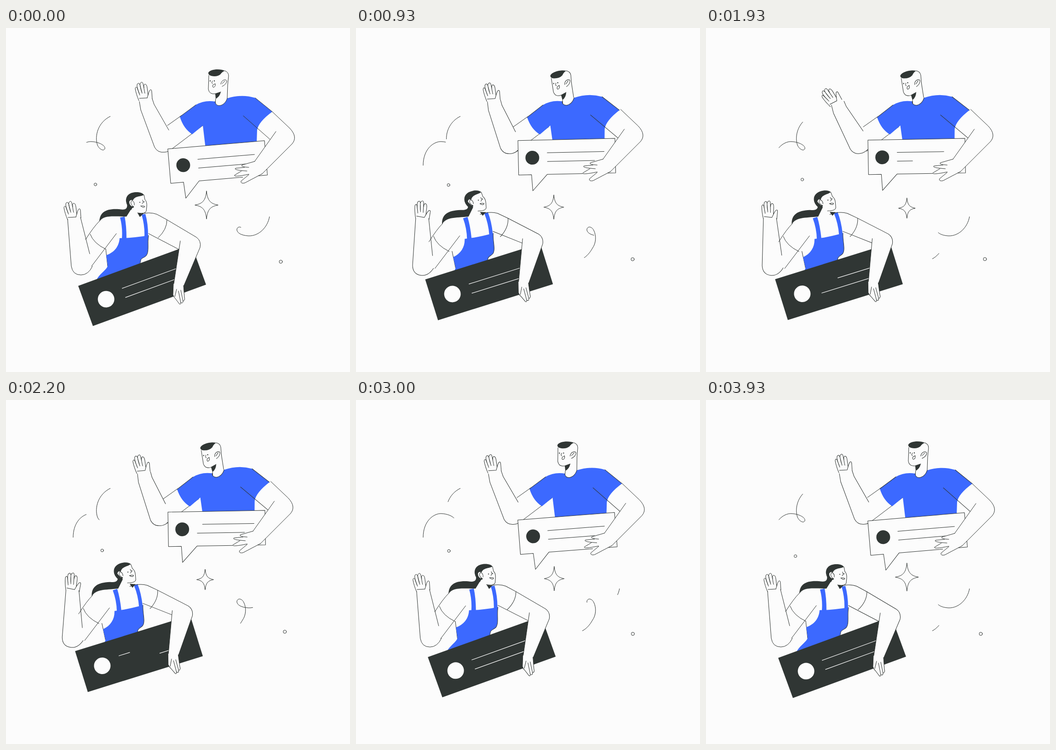
These frames come from a looping animation (748x748 px, 4 s). An HTML page:

```html
<!DOCTYPE html>
<html lang="en">
<head>
<meta charset="utf-8">
<title>Two people waving with cards</title>
<style>
  html, body { margin: 0; width: 100%; height: 100%; overflow: hidden; background: #fcfcfc; }
  svg { display: block; width: 100vw; height: 100vh; fill: none; stroke: #2c312f; stroke-width: 1; stroke-linecap: round; stroke-linejoin: round; }
  .blue { fill: #3c69ff; stroke: none; }
  .dark { fill: #303634; stroke: none; }
  .skin { fill: #fcfcfc; }
  .mask { fill: #fcfcfc; stroke: none; }
  .pale { stroke: #fcfcfc; stroke-width: 1.2; }
  .curl { stroke-linecap: butt; }
</style>
</head>
<body>
<svg viewBox="0 0 748 748">
  <defs>
    <path id="hand" d="M-10 6Q-16 -8 -18 -20Q-17 -26 -14 -22L-8 -6M-9 -9Q-15 -24 -14 -29Q-11 -35 -8 -29L-3 -10M-4 -13Q-9 -29 -7 -32Q-3 -37 -1 -31L3 -10M1 -22Q0 -29 3 -30Q7 -30 8 -22L10 -6M8 0Q12 -15 14 -17Q18 -20 18 -12L19 2M-9 1L8 0"/>
  </defs>

  <path id="curlLeft" class="curl" pathLength="100" stroke-dasharray="70 30" d="M146 299C146 262 170 246 186 247C204 248 216 256 215 262C213 269 203 264 199 255C192 235 200 205 227 192"/>
  <path id="curlRight" class="curl" pathLength="100" stroke-dasharray="57.5 42.5" d="M573 410C569 433 550 453 527 452C512 451 503 446 502 439C502 431 512 430 517 440C523 452 522 468 514 479C508 490 500 498 492 502"/>
  <path id="star" vector-effect="non-scaling-stroke" d="M0 -30C2 -10 8 -3 25 0C8 3 2 10 0 30C-2 10 -8 3 -25 0C-8 -3 -2 -10 0 -30Z"/>
  <circle id="dotLeft" r="3"/>
  <circle id="dotRight" r="3.5"/>

  <g id="man">
    <g id="manArm">
      <path d="M351 212L382 190M428 212L358 265"/>
      <g id="manForearm">
        <path d="M354 222L322 166L318 154M290 160L293 178L323 259Q330 272 345 270Q352 270 362 262"/>
        <g id="manHand"><use href="#hand" x="299" y="152"/></g>
      </g>
    </g>
    <g id="shirt">
      <path class="blue" d="M378 193L413 167Q432 156 455 160C455 173 475 172 481 153Q512 143 542 152L579 182Q549 204 546 222L545 252L434 262L428 212L405 231Q386 219 378 193Z"/>
      <path d="M378 193L413 167M542 152L579 182M516 191L575 243M455 160C455 173 475 172 481 153"/>
    </g>
    <g id="manHead">
      <path class="dark" d="M440 97C444 89 466 88 476 93Q470 95 466 101Q458 107 446 104Q439 102 440 97ZM455 143L467 139Q465 149 456 154Z"/>
      <path d="M476 93Q484 96 484 104L482 124L481 153M441 103L440 133Q442 145 455 143L467 139M456 154L455 162"/>
      <path d="M449 115Q446 120 449 121M450 124L455 121Q456 128 451 129Q448 128 450 124M467 122C468 113 478 110 480 115C480 121 474 125 470 127M470 121L476 115"/>
      <g id="manEyes" class="dark"><circle cx="444" cy="115" r="1.2"/><circle cx="453" cy="115" r="1.2"/></g>
    </g>
    <g id="manCard">
      <path class="skin" d="M-211 0H0V75H-149L-181 110L-183 75H-211Z"/>
      <circle class="dark" cx="-180.5" cy="38" r="15"/>
      <path id="manLine1"/><path id="manLine2"/>
    </g>
    <g id="manGrip">
      <path class="skin" d="M579 182L617 218Q635 237 622 252L556 318L540 291L587 225"/>
      <path class="mask" d="M541 290L513 298L512 303L498 306L505 312L496 322L516 322L511 336L520 337L557 317Z"/>
      <path d="M541 290L513 298Q509 302 528 303M519 303L499 305Q494 309 524 311M512 311L497 320Q494 325 528 318M528 319L511 333Q510 339 519 337L557 317"/>
    </g>
  </g>

  <g id="woman">
    <g id="womanForearm">
      <path d="M162 412L182 491M134 416L142 518Q145 537 163 537Q179 537 188 518"/>
      <g id="womanHand"><use href="#hand" x="144" y="411"/></g>
    </g>
    <path id="womanSleeve" d="M203 420Q190 433 173 460M183 448Q190 468 217 481M240 447L186 518"/>
    <g id="womanTorso">
      <path d="M217 481L221 518M310 447L377 482"/>
      <path class="dark" d="M286 402L299 404L291 411Z"/>
      <path class="blue" d="M248 412L258 410Q262 430 262 457L252 458Q254 435 248 412ZM295 406L303 404Q309 425 309 452L301 454Q302 430 295 406Z"/>
      <path class="blue" d="M247 457Q275 457 310 451C307 468 312 486 305 495C300 500 294 500 293 505L291 515L230 560L197 548C202 535 222 524 221 516L218 494C236 488 246 474 247 457Z"/>
      <path d="M310 451C307 468 312 486 305 495C300 500 294 500 293 505L291 515"/>
    </g>
    <path id="ponytail" class="dark" d="M262 376C266 392 262 397 246 394C218 392 204 400 203 421C213 406 232 410 262 410L274 391Z"/>
    <g id="womanHead">
      <path class="dark" d="M261 377C260 362 272 356 287 357Q297 358 300 363C292 367 280 365 276 375Q270 372 268 378Q268 386 276 389L272 396Q262 386 261 377Z"/>
      <path d="M300 363L302 373Q307 378 306 388L305 398Q303 405 286 402M297 374Q300 381 296 382M293 387Q298 386 302 388Q300 393 293 387M276 388Q268 380 274 375Q280 378 279 385"/>
      <g class="dark"><circle cx="291" cy="379" r="1.1"/><circle cx="300" cy="378" r="1.1"/><circle cx="276" cy="389" r="2"/></g>
    </g>
    <g id="womanCard">
      <path class="dark" d="M-262 0H0V-93H-262Z"/>
      <circle class="mask" cx="-215" cy="-45" r="18"/>
      <path id="womanLine1" class="pale"/><path id="womanLine2" class="pale"/>
    </g>
    <g id="womanGrip">
      <path d="M290 405Q312 399 328 405L350 417Q350 438 331 456"/>
      <path class="skin" d="M350 417L414 455Q425 463 422 477L386 562L364 562L379 463"/>
      <path class="mask" d="M364 556L363 580L368 588L377 600L380 600L385 596L388 588L386 559Z"/>
      <path d="M364 556L363 580Q365 586 368 588L377 600Q380 602 380 597L375 572M380 597Q385 600 385 594L380 570M385 594Q390 592 388 586L386 560M371 568L367 584"/>
    </g>
  </g>
</svg>
<script>
const FRAMES = 60, STEP = 4000 / FRAMES, RETURN = 41;
const TAU = 2 * Math.PI;
const $ = id => document.getElementById(id);
const place = (id, transform) => $(id).setAttribute('transform', transform);

const ease = (f, start, length) => {
  const u = Math.min(1, Math.max(0, (f - start) / length));
  return u * u * (3 - 2 * u);
};

// Damped step from 0 to 1 that overshoots by a fifth after seven frames.
function spring(f) {
  if (f <= 0) return 0;
  const omega = Math.PI / 7, decay = Math.log(5) / 7;
  return 1 - Math.exp(-decay * f) * (Math.cos(omega * f) + decay / omega * Math.sin(omega * f));
}

// Three swings of an arm, from 0 to 1 and back.
function wave(f, start) {
  const swings = (f - start) / 9.6;
  return swings > 0 && swings < 3 ? (1 - Math.cos(TAU * swings)) / 2 : 0;
}

const cycle = (f, period, peak) => Math.cos(TAU * (f - peak) / period);

// A card line is wiped from the left and written again, twice per loop.
function drawLine(id, f, { x0, x1, y, start, period, hold }) {
  const erase = f < start + period ? start : start + period;
  const gone = ease(f, erase, 6.3), written = ease(f, erase + hold, 6.3);
  const x = u => x0 + (x1 - x0) * u;
  let d = '';
  if (written > 0) d += `M${x0} ${y}H${x(written)}`;
  if (gone < 1) d += `M${x(gone)} ${y}H${x1}`;
  $(id).setAttribute('d', d);
}

function drawMan(f) {
  const back = spring(f - RETURN);
  const lean = ease(f, 0, 13) - back;
  const nod = ease(f, 0, 15) - back;
  const tilt = ease(f, 4, 12) - back;
  place('manArm', `translate(${-9 * lean} ${3 * lean})`);
  place('manForearm', `rotate(${8 * wave(f, 9) - 5.3 * lean} 340 262)`);
  place('manHand', `rotate(${-20 * wave(f, 5.6)} 304 165)`);
  place('shirt', `translate(${-6 * lean} ${-lean}) rotate(${-1.3 * lean} 475 190)`);
  place('manHead', `translate(${-6.5 * lean} 0) rotate(${-11 * nod} 470 158)`);
  place('manCard', `translate(${562 + lean} ${245 - 5 * lean}) rotate(${-4.9 + 3.9 * tilt})`);
  place('manGrip', `translate(${-3.5 * lean} ${-5 * lean})`);
  const blink = f >= 37 && f <= 39;
  place('manEyes', blink ? 'translate(0 97.75) scale(1 .15)' : '');

  const timing = { x0: -148, period: 12.6, hold: 5.2 };
  drawLine('manLine1', f, { ...timing, x1: -24, y: 28, start: 19.2 });
  drawLine('manLine2', f, { ...timing, x1: -45, y: 47, start: 21.4 });
}

function drawWoman(f) {
  const lean = spring(f) - spring(f - RETURN);
  const swing = wave(f, 7.4);
  place('womanForearm', `translate(${-20 * lean} ${lean}) rotate(${12 * swing} 163 518)`);
  place('womanHand', `rotate(${8 * swing} 146 414)`);
  place('womanSleeve', `translate(${-15 * lean} ${5 * lean})`);
  place('womanTorso', `translate(${-2 * lean} 0) rotate(${-6 * lean} 258 545)`);
  place('ponytail', `translate(${-19 * lean} 0) rotate(${-6 * lean} 262 400)`);
  place('womanHead', `translate(${-22 * lean} ${-6 * lean}) rotate(${-10 * lean} 296 402)`);
  place('womanCard', `translate(${435 - 7 * lean} ${558 - lean}) rotate(${-20.1 + 2.8 * lean})`);
  place('womanGrip', `rotate(${-3.5 * lean} 285 746)`);

  const timing = { x0: -174, x1: -50, period: 11, hold: 4.7 };
  drawLine('womanLine1', f, { ...timing, y: -55, start: 15.5 });
  drawLine('womanLine2', f, { ...timing, y: -34, start: 18 });
}

function drawDecor(f) {
  const shift = 10 * (f % 10);
  $('curlLeft').setAttribute('stroke-dashoffset', -30 - shift);
  $('curlRight').setAttribute('stroke-dashoffset', -shift);
  const size = .87 + .14 * cycle(f, 60, -.5);
  place('star', `translate(${433.5 + 5 * cycle(f, 30, 25)} ${388.5 + 3.5 * cycle(f, 20, 10)}) scale(${size})`);
  place('dotLeft', `translate(${202 + 7.5 * cycle(f, 60, 30)} ${334.5 + 8.5 * cycle(f, 60, 8)})`);
  place('dotRight', `translate(${602 + 4.5 * cycle(f, 60, 30)} ${505.5 + 4 * cycle(f, 60, 52)})`);
}

const begin = performance.now();
function tick(now) {
  const elapsed = Math.max(0, now - begin);
  const frame = Math.floor((elapsed + 4) / STEP) % FRAMES;
  drawMan(frame);
  drawWoman(frame);
  drawDecor(frame);
  requestAnimationFrame(tick);
}
tick(begin);
</script>
</body>
</html>
```
